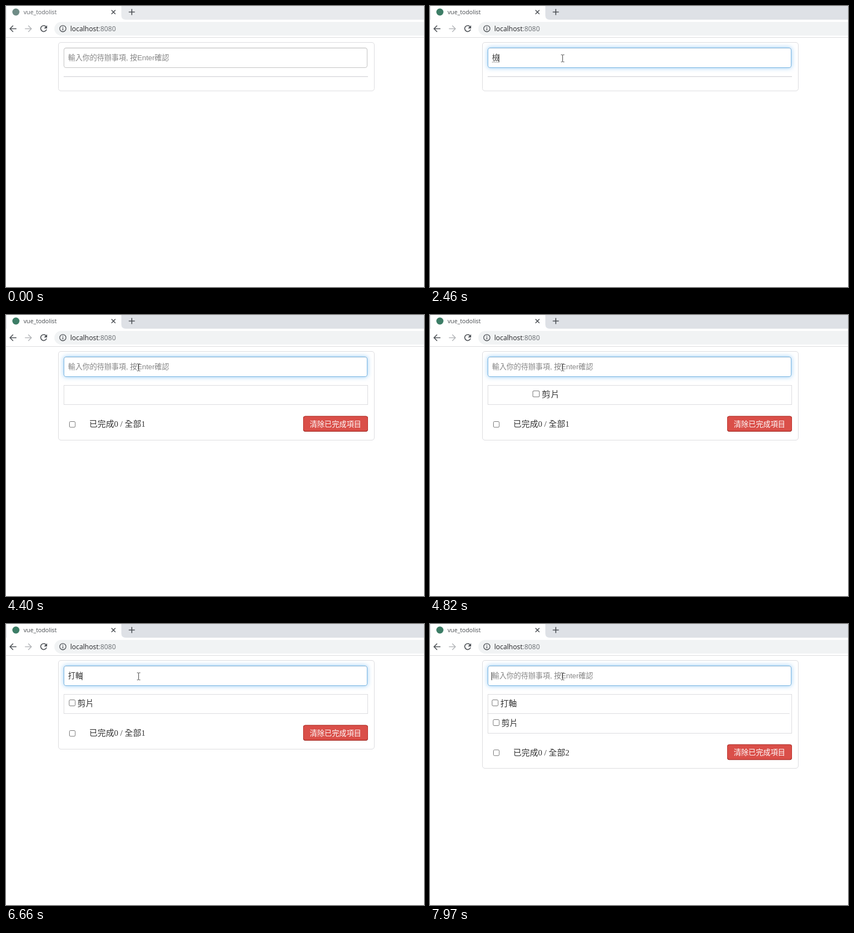
An HTML page for the animation above (8 s loop, 761 by 513 pixels).

```html
<!DOCTYPE html>
<html lang="zh-Hant">
<head>
<meta charset="utf-8">
<title>vue_todolist</title>
<style>
html, body { margin: 0; width: 100%; height: 100%; overflow: hidden; background: #fff; }
#stage { position: relative; width: 761px; height: 513px; overflow: hidden; }
svg { position: absolute; left: 0; top: 0; }
#field {
  position: absolute; left: 105px; top: 76px; width: 553px; height: 37px; box-sizing: border-box;
  border: 1px solid #c4c4c4; border-radius: 4px; box-shadow: inset 0 1px 1px rgba(0,0,0,.075);
}
.strip { fill: #e8eaed; }
.tab { fill: #5f6368; font: 10.7px "Open Sans", sans-serif; }
.icon { fill: none; stroke: #4d5156; stroke-width: 1.6; }
.badge { fill: #6f8c86; }
.active .strip { fill: #dee1e6; }
.active .tab { fill: #45494d; }
.active .badge { fill: #3c7d66; }
.url { fill: #202124; font: 12.3px "Open Sans", sans-serif; }
.line { fill: none; stroke: #dcdcdf; }
.box { fill: #fff; stroke: #767676; }
.small { font: 300 13.2px "Liberation Sans", "Noto Sans CJK TC", "Noto Sans CJK JP", sans-serif; }
.big { fill: #333; font: 300 15.1px "Liberation Serif", "Noto Sans CJK TC", "Noto Sans CJK JP", sans-serif; }
.row { transform-origin: 382px 0; }
</style>
</head>
<body>
<div id="stage">
  <div id="field"></div>
  <svg width="761" height="513" viewBox="0 0 761 513">
    <rect class="strip" width="761" height="25"/>
    <path d="M1 26V0H210V17Q210 25 218 25V26Z" fill="#fff"/>
    <circle class="badge" cx="18" cy="11" r="6.5"/>
    <text class="tab" x="32" y="15">vue_todolist</text>
    <path class="icon" d="M192 7.500l7.200 7.200M199.200 7.500l-7.200 7.200M223.500 11h11M229 5.500v11"/>
    <path class="icon" d="M19 41.500H7.500M13 35.800L7.300 41.500L13 47.200"/>
    <path class="icon" d="M34.500 41.500H46M40.500 35.800L46.200 41.500L40.500 47.200" style="stroke:#b6b8bb"/>
    <path class="icon" d="M72.700 37.600A5.400 5.400 0 1 0 73.800 42.800"/>
    <path d="M74.800 35.200V41H69Z" fill="#4d5156"/>
    <path d="M761 29H100.500A12.500 12.500 0 0 0 100.500 54H761Z" fill="#f1f3f4"/>
    <circle class="icon" cx="103.500" cy="41.300" r="5.700" style="stroke-width:1.300"/>
    <path class="icon" d="M103.500 40.500v4M103.500 37.800v1.500" style="stroke-width:1.400"/>
    <text class="url" x="117" y="46">localhost<tspan fill="#6a6e73">:8080</tspan></text>
    <path class="line" d="M0 57.500H761"/>

    <rect class="line" id="panel" x="95.500" y="66.500" width="575" rx="4.500"/>
    <rect class="line" id="list" x="105.500" y="128.500" width="553"/>

    <g id="foot">
      <rect class="box" x="115.500" y="194.500" width="10.500" height="10.500" rx="2"/>
      <text class="big" x="151.500" y="204.300">已完成0 / 全部<tspan id="total">1</tspan></text>
      <rect x="541" y="184.500" width="118" height="28.500" rx="4" fill="#8f2a25"/>
      <rect x="541.500" y="185" width="117" height="27" rx="3.500" fill="#da4f49" stroke="#bd362f"/>
      <text class="small" x="553" y="203.800" fill="#fff" style="font-size:13.4px;font-weight:400">清除已完成項目</text>
    </g>

    <g id="slotA"><g class="row">
      <rect class="box" x="115" y="138.500" width="11" height="11" rx="2"/>
      <text class="big" x="130" y="150">剪片</text>
    </g></g>
    <g id="slotB"><g class="row">
      <path class="line" d="M106 163.500H658"/>
      <rect class="box" x="115" y="138.500" width="11" height="11" rx="2"/>
      <text class="big" x="130" y="150">打軸</text>
    </g></g>

    <text class="small" id="entry" x="113" y="99.300"></text>
    <path id="under" stroke="#555" stroke-dasharray="1 1"/>
    <rect id="caret" y="88" width="1" height="14.500" fill="#222"/>
    <path id="arrow" d="M0 0V14L3.300 11L5.500 16L7.700 15L5.500 10.200H10Z" fill="#fff" stroke="#222" stroke-width=".8"/>
    <path id="beam" d="M-3 -6.500H-1L0 -6L1 -6.500H3M0 -6V6M-3 6.500H-1L0 6L1 6.500H3" fill="none" stroke="#444"/>
  </svg>
</div>
<script>
const LOOP = 8000, STEP = 70, EM = 13.2;
const FOCUS = 940, ADD_A = 4400, ADD_B = 6990;
const HINT = '輸入你的待辦事項, 按Enter確認';
const $ = id => document.getElementById(id);
const stage = $('stage'), field = $('field');

// time, text, composing, caret
const typing = [
  [0, '', 0, 0], [FOCUS, '', 0, 1],
  [1430, 'ㄐ', 1, 1], [1780, 'ㄐㄧ', 1, 1], [2060, 'ㄐㄧㄢ', 1, 1], [2460, '檢', 1, 1],
  [2790, '檢ㄆ', 1, 1], [2990, '檢ㄆㄧ', 1, 1], [3060, '檢ㄆㄧㄢ', 1, 1], [3190, '剪片', 1, 1],
  [3730, '剪片', 1, 0], [3930, '剪片', 0, 1],
  [ADD_A, '', 0, 0], [4960, '', 0, 1],
  [5240, 'ㄉ', 1, 1], [5380, 'ㄉㄚ', 1, 1], [5450, '打', 1, 1],
  [5720, '打ㄓ', 1, 1], [5920, '打ㄓㄡ', 1, 1], [6190, '打軸', 1, 1],
  [6590, '打軸', 1, 0], [6660, '打軸', 0, 1],
  [ADD_B, '', 0, 0], [7550, '', 0, 1]
];

// time, x, y
const pointer = [
  [330, 12, 6], [400, 95, 30], [470, 180, 56], [540, 250, 76],
  [610, 286, 90], [870, 256, 94], [FOCUS, 241.5, 95.5]
];

const at = (list, t) => list.findLast(e => e[0] <= t);
const show = (el, on) => { el.style.display = on ? '' : 'none'; };
const snap = (t, from) => from + Math.floor((t - from) / STEP) * STEP;

function bounceIn(slot) {
  const row = slot.firstElementChild;
  const pose = (offset, x, scale, opacity = 1) =>
    ({ offset, opacity, transform: `translateX(${x}px) scaleX(${scale})`, easing: 'cubic-bezier(.215,.61,.355,1)' });
  const anim = row.animate(
    [pose(0, 3000, 3, 0), pose(.6, -25, 1), pose(.75, 10, .98), pose(.9, -5, .995), pose(1, 0, 1)],
    { duration: 1000, fill: 'both' });
  anim.pause();
  return anim;
}
const inA = bounceIn($('slotA')), inB = bounceIn($('slotB'));

function drawEntry(t) {
  const [, text, composing, caret] = at(typing, t);
  const end = 113 + text.length * EM;
  $('entry').textContent = text || HINT;
  $('entry').setAttribute('fill', text ? '#333' : '#858585');
  $('under').setAttribute('d', `M113 102.500H${end}`);
  show($('under'), composing);
  $('caret').setAttribute('x', Math.floor(end - (text ? .5 : 1)));
  show($('caret'), caret);
}

function drawFocus(t) {
  const k = Math.min(1, Math.max(0, (t - FOCUS + STEP) / 150));
  stage.classList.toggle('active', t >= 870);
  field.style.borderColor = k ? `color-mix(in srgb, #75b2e0 ${k * 100}%, #c4c4c4)` : '';
  field.style.boxShadow =
    `inset 0 1px 1px rgba(0,0,0,.075), 0 0 8px rgba(82,168,236,${.6 * k})`;
}

function drawPointer(t) {
  const p = at(pointer, t), onField = p && p[2] > 80;
  show($('arrow'), p && !onField);
  show($('beam'), onField);
  if (p) (onField ? $('beam') : $('arrow')).setAttribute('transform', `translate(${p[1]} ${p[2]})`);
}

function drawList(t) {
  const count = (t >= ADD_A) + (t >= ADD_B);
  $('panel').setAttribute('height', [88.5, 162, 197][count]);
  $('list').setAttribute('height', [.6, 35, 71][count]);
  $('total').textContent = count;
  show($('foot'), count);
  $('foot').setAttribute('transform', `translate(0 ${count > 1 ? 35.3 : 0})`);
  show($('slotA'), count);
  show($('slotB'), count > 1);
  $('slotA').setAttribute('transform', `translate(0 ${count > 1 ? 36 : 0})`);
  inA.currentTime = snap(t, ADD_A) - 4406;
  inB.currentTime = snap(t, ADD_B) - 7052;
}

const start = performance.now();
function frame() {
  const t = (performance.now() - start) % LOOP;
  drawEntry(t);
  drawFocus(t);
  drawPointer(t);
  drawList(t);
  requestAnimationFrame(frame);
}
frame();
</script>
</body>
</html>
```
